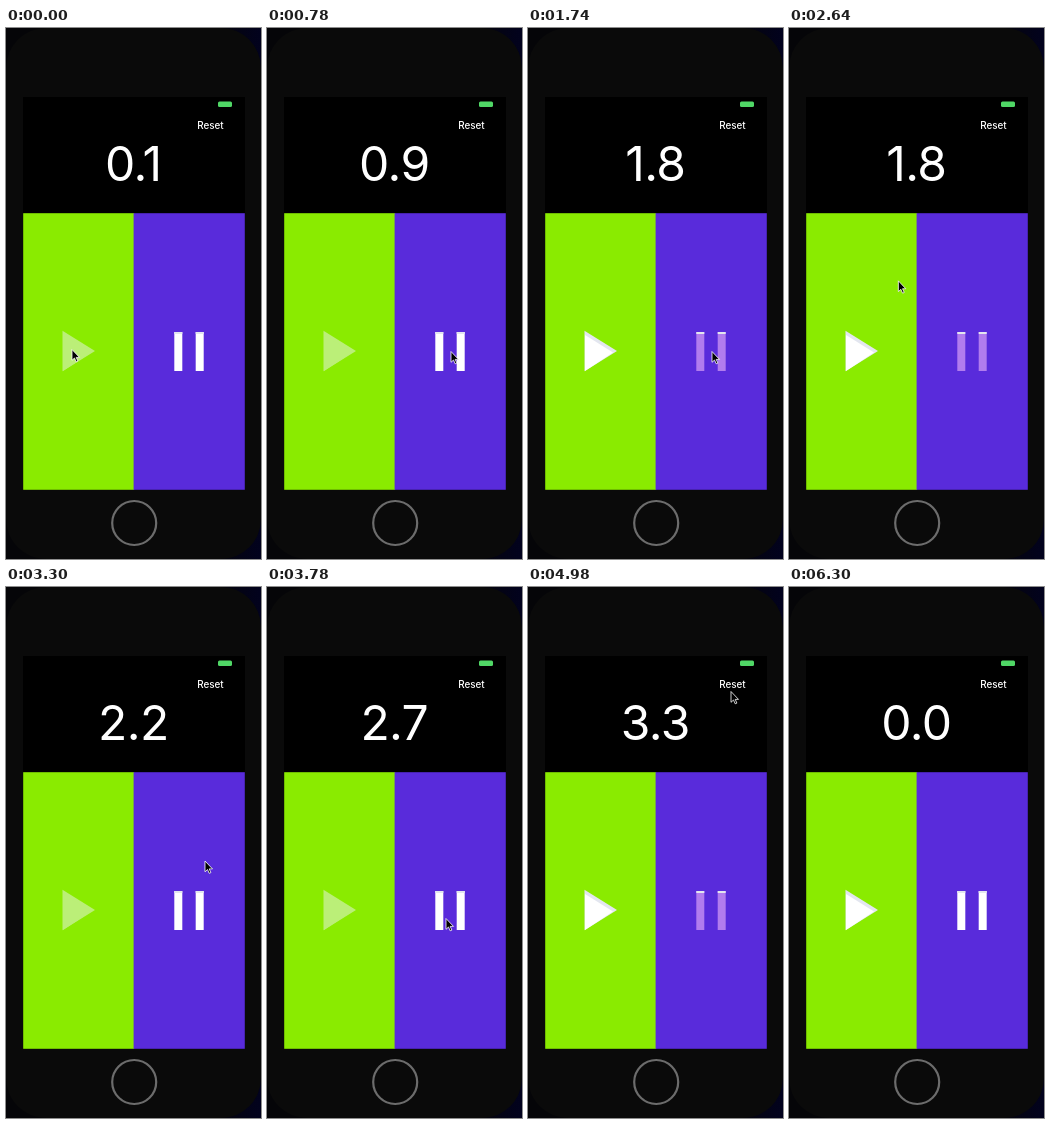
An HTML page that plays this animation: 255 by 531 pixels, repeating every 6660 ms.

```html
<!DOCTYPE html>
<html lang="en">
<head>
<meta charset="utf-8">
<title>Stopwatch</title>
<style>
  html, body { margin: 0; width: 100%; height: 100%; overflow: hidden; background: #000; }
  svg { display: block; width: 100%; height: 100%; }
  text { fill: #fff; font-family: Inter, Roboto, sans-serif; }
  #count { font-size: 48px; font-weight: 400; letter-spacing: -.6px; text-anchor: middle; }
  #reset { font-size: 9.9px; font-weight: 500; text-anchor: end; }
  .icon { fill: #fff; }
  .edge { fill: #e3e6ef; }
  #pause .edge { fill: #dcf0bc; }
  #play.dim, #play.dim .edge { fill: #bbef78; }
  #pause.dim { fill: #b17cee; }
  #pause.dim .edge { fill: #9c75d8; }
</style>
</head>
<body>
<svg viewBox="0 0 255 531" preserveAspectRatio="none">
  <defs>
    <linearGradient id="back">
      <stop offset=".8" stop-color="#050508"/>
      <stop offset="1" stop-color="#02021e"/>
    </linearGradient>
    <g id="bar">
      <rect width="8" height="39"/>
      <rect class="edge" width="8" height="2"/>
    </g>
  </defs>
  <rect width="255" height="531" fill="url(#back)"/>
  <rect width="255" height="531" rx="40" fill="#0a0a0a"/>
  <rect x="17" y="69" width="222" height="393"/>
  <rect x="212" y="73.6" width="14" height="5.4" rx="1.5" fill="#50d766"/>
  <text id="reset" x="217.7" y="101.3">Reset</text>
  <text id="count" x="127.3" y="153">0.1</text>

  <rect x="17.2" y="185.2" width="111" height="276.6" fill="#8aeb00"/>
  <rect x="127.6" y="185.2" width="111.2" height="276.6" fill="#592bdb"/>

  <g id="play" class="icon">
    <path class="edge" d="M56.5 302.7L89 323L56.5 343.3Z"/>
    <path d="M57 307L85 324.5L57 343Z"/>
  </g>
  <g id="pause" class="icon">
    <use href="#bar" x="168.3" y="304"/>
    <use href="#bar" x="189.7" y="304"/>
  </g>

  <circle cx="128.2" cy="495" r="22" fill="none" stroke="#6c6c6c" stroke-width="2.2"/>
  <path id="cursor" d="M0 0V10.8L2.5 8.5L4.2 12.3L5.9 11.6L4.2 7.9H7.5Z"
        fill="#000" stroke="#fff" stroke-width=".8" stroke-linejoin="round"/>
</svg>
<script>
  const LOOP = 6660, STEP = 60, TICK = 92;
  const PAUSE_1 = 1620, RESUME = 2880, PAUSE_2 = 4320, RESET = 5280, EXIT = 6240;

  // Places the cursor visits
  const onPlay = [66, 321.5], onPause = [184, 323.5], onReset = [203, 104.5];
  const beside = [199, 274], underPause = [179, 331.5], bottom = [217, 523];

  // Each glide: destination, departure, arrival
  const glides = [
    [onPause, STEP, 780],
    [onReset, PAUSE_1 + 180, 2280],
    [onPlay, 2340, RESUME - STEP],
    [beside, RESUME + STEP, 3300],
    [underPause, 3300, 3720],
    [onReset, PAUSE_2 + STEP, 4920],
    [bottom, RESET + STEP, 5940]
  ];

  const [count, play, pause, cursor] =
    ["count", "play", "pause", "cursor"].map(id => document.getElementById(id));

  const clamp = (v, lo, hi) => Math.min(hi, Math.max(lo, v));
  const ease = p => p * p * (3 - 2 * p);
  const ticks = ms => Math.floor(ms / TICK);

  function tenths(t) {
    if (t >= RESET) return 0;
    return 1 + ticks(Math.min(t, PAUSE_1)) + ticks(clamp(t, RESUME, PAUSE_2) - RESUME);
  }

  function cursorAt(t) {
    return glides.reduce((at, [to, leave, arrive]) => {
      const e = ease(clamp((t - leave) / (arrive - leave), 0, 1));
      return at.map((v, i) => v + (to[i] - v) * e);
    }, onPlay);
  }

  function draw(now) {
    const time = now % LOOP;
    const t = time < 2 * STEP ? 0 : Math.floor(time / STEP) * STEP;
    const running = t < PAUSE_1 || (t >= RESUME && t < PAUSE_2);
    count.textContent = (tenths(t) / 10).toFixed(1);
    play.classList.toggle("dim", running);
    pause.classList.toggle("dim", !running && t < RESET);
    cursor.style.display = t < EXIT ? "" : "none";
    cursor.setAttribute("transform", `translate(${cursorAt(t)})`);
  }

  const start = performance.now();
  function frame() {
    draw(performance.now() - start);
    requestAnimationFrame(frame);
  }
  frame();
</script>
</body>
</html>
```
